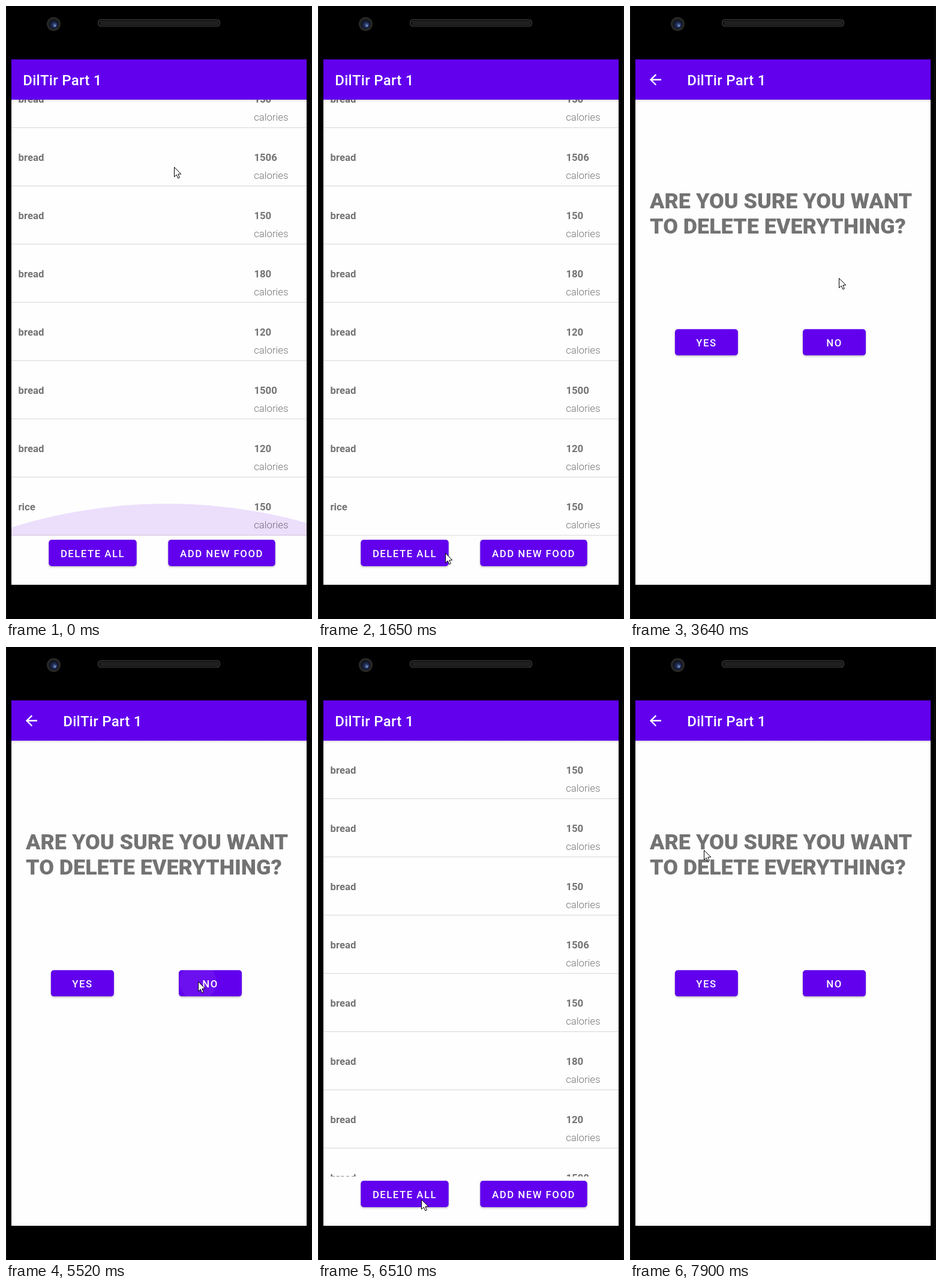
Animation, 510 px wide and 1021 px high, one loop 8 s. Source, as an HTML page with a canvas:

```html
<!DOCTYPE html>
<html lang="en">
<head>
<meta charset="utf-8">
<title>Calorie list</title>
<style>
  html, body { margin: 0; width: 100%; height: 100%; overflow: hidden; background: #000; }
  canvas { display: block; width: 510px; height: 1021px; }
</style>
</head>
<body>
<canvas id="stage" width="510" height="1021"></canvas>
<script>
const ctx = document.getElementById('stage').getContext('2d');
const LOOP = 8000;
const PURPLE = '#6200ee', PAPER = '#fefefe', GREY = '#737373';
const SCREEN = { x: 9, y: 89, w: 492, h: 875 };
const LIST_TOP = 156, LIST_BOTTOM = 882, ROW = 97;
const TITLE = 'DilTir Part 1';

const foods = [150, 150, 150, 1506, 150, 180, 120, 1500, 120, 150]
  .map((calories, i) => ({ name: i === 9 ? 'rice' : 'bread', calories }));

const buttons = {
  deleteAll: { label: 'DELETE ALL', x: 71.3, y: 889, w: 146.4, h: 44 },
  addFood: { label: 'ADD NEW FOOD', x: 270.3, y: 889, w: 178.4, h: 44 },
  yes: { label: 'YES', x: 74.9, y: 538.3, w: 105, h: 43.5 },
  no: { label: 'NO', x: 288, y: 538.3, w: 105, h: 43.5 }
};

const cadence = [
  [0, 1], [120, 7], [1140, 1], [1260, 3], [1650, 4], [2230, 1], [2380, 7], [3370, 1],
  [3520, 1], [3640, 6], [4450, 1], [4740, 6], [5520, 1], [5640, 1], [5790, 5],
  [6510, 1], [6970, 7], [7900, 1], [LOOP, 1]
];

const pointer = [
  [0, 280, 268], [1140, 334, 916], [1650, 212, 911], [2085, 152, 918], [2380, 152, 919],
  [3370, 361, 355], [3640, 348, 453], [4450, 136, 560], [4740, 146, 563], [5100, 240, 567],
  [5520, 320, 557], [5790, 319, 558], [6510, 172, 920], [7230, 172, 920],
  [7900, 123, 338], [LOOP, 123, 338]
];

const presses = [
  { at: 2080, button: buttons.deleteAll, x: 152, y: 918 },
  { at: 5515, button: buttons.no, x: 320, y: 558 },
  { at: 6965, button: buttons.deleteAll, x: 172, y: 920 }
];

const visits = [
  { at: 0, draw: t => drawList(t, 244) },
  { at: 2380, draw: drawConfirm },
  { at: 5790, draw: t => drawList(t, 0) },
  { at: 7230, draw: drawConfirm }
];

const clamp = v => Math.min(1, Math.max(0, v));
const smooth = p => p * p * (3 - 2 * p);

function lastAt(items, t, timeOf) {
  let i = items.length - 1;
  while (i > 0 && timeOf(items[i]) > t) i--;
  return i;
}

function stepTime(t) {
  const i = Math.min(lastAt(cadence, t, c => c[0]), cadence.length - 2);
  const [start, steps] = cadence[i];
  const span = (cadence[i + 1][0] - start) / steps;
  return start + span * Math.floor((t - start) / span + 1e-6);
}

// Cubic bezier (0.4, 0, 0.2, 1)
function fastOutSlowIn(p) {
  let lo = 0, hi = 1;
  for (let i = 0; i < 20; i++) {
    const u = (lo + hi) / 2, v = 1 - u;
    if (1.2 * v * v * u + 0.6 * v * u * u + u * u * u < p) lo = u; else hi = u;
  }
  return lo * lo * (3 - 2 * lo);
}

function rect(x, y, w, h, color) {
  ctx.fillStyle = color;
  ctx.fillRect(x, y, w, h);
}

function roundRect(x, y, w, h, r) {
  ctx.beginPath();
  ctx.roundRect(x, y, w, h, r);
}

function disc(x, y, r, color) {
  ctx.fillStyle = color;
  ctx.beginPath();
  ctx.arc(x, y, r, 0, Math.PI * 2);
  ctx.fill();
}

function text(str, x, y, size, weight, color, spacing = 0, align = 'left') {
  ctx.font = `${weight} ${size}px Roboto, sans-serif`;
  ctx.letterSpacing = spacing + 'px';
  ctx.textAlign = align;
  ctx.fillStyle = color;
  ctx.fillText(str, x, y);
}

function clipped(x, y, w, h, draw) {
  ctx.save();
  ctx.beginPath();
  ctx.rect(x, y, w, h);
  ctx.clip();
  draw();
  ctx.restore();
}

function drawButton(button, t) {
  const { x, y, w, h, label } = button;
  ctx.save();
  ctx.shadowColor = 'rgba(0,0,0,.26)';
  ctx.shadowBlur = 3;
  ctx.shadowOffsetY = 1.6;
  ctx.fillStyle = PURPLE;
  roundRect(x, y, w, h, 4.8);
  ctx.fill();
  ctx.restore();

  const press = presses.find(p => p.button === button && t >= p.at && t < p.at + 400);
  if (press) {
    const age = t - press.at;
    ctx.save();
    roundRect(x, y, w, h, 4.8);
    ctx.clip();
    disc(press.x, press.y, 29 + age * 0.35, `rgba(255,255,255,${0.06 + 0.08 * clamp(age / 150)})`);
    ctx.restore();
  }
  text(label, x + w / 2, y + h / 2 + 6.7, 16.76, 500, '#fff', 1.5, 'center');
}

function drawPage(titleX) {
  rect(SCREEN.x, SCREEN.y, SCREEN.w, SCREEN.h, PAPER);
  const shade = ctx.createLinearGradient(0, LIST_TOP, 0, LIST_TOP + 4);
  shade.addColorStop(0, 'rgba(0,0,0,.13)');
  shade.addColorStop(1, 'rgba(0,0,0,0)');
  return () => {
    rect(SCREEN.x, LIST_TOP, SCREEN.w, 4, shade);
    rect(SCREEN.x, SCREEN.y, SCREEN.w, LIST_TOP - SCREEN.y, PURPLE);
    text(TITLE, titleX, 131.7, 23.94, 500, '#fff', 0.3);
  };
}

function drawGlow(t) {
  const fade = (1 - clamp(t / 600)) ** 2;
  if (!fade) return;
  ctx.fillStyle = `rgba(98,0,238,${0.12 * fade})`;
  ctx.beginPath();
  ctx.ellipse(268, LIST_BOTTOM + 812 * fade, 865, 865 * fade, 0, 0, Math.PI * 2);
  ctx.fill();
}

function drawList(t, scroll) {
  const drawBar = drawPage(28.2);
  clipped(SCREEN.x, LIST_TOP, SCREEN.w, LIST_BOTTOM - LIST_TOP, () => {
    foods.forEach((food, i) => {
      const top = LIST_TOP + i * ROW - scroll;
      text(food.name, 20.5, top + 55, 16.76, 700, GREY);
      text(food.calories, 413.4, top + 55, 16.76, 700, GREY);
      text('calories', 413.2, top + 84.5, 16.76, 300, GREY);
      rect(SCREEN.x, top + 96, SCREEN.w, 1.2, '#dcdcdc');
    });
    if (scroll) drawGlow(t);
  });
  drawBar();
  drawButton(buttons.deleteAll, t);
  drawButton(buttons.addFood, t);
}

const backArrow = new Path2D('M20 11H7.83l5.59-5.59L12 4l-8 8 8 8 1.41-1.41L7.83 13H20z');

function drawConfirm(t) {
  drawPage(95.2)();
  ctx.save();
  ctx.translate(28.1, 108.4);
  ctx.scale(1.197, 1.197);
  ctx.fillStyle = '#fff';
  ctx.fill(backArrow);
  ctx.restore();
  text('ARE YOU SURE YOU WANT', 33, 337, 35.9, 900, GREY);
  text('TO DELETE EVERYTHING?', 33, 379, 35.9, 900, GREY);
  drawButton(buttons.yes, t);
  drawButton(buttons.no, t);
}

function scaled(scale, draw) {
  const cx = SCREEN.x + SCREEN.w / 2, cy = SCREEN.y + SCREEN.h / 2;
  ctx.save();
  ctx.translate(cx, cy);
  ctx.scale(scale, scale);
  ctx.translate(-cx, -cy);
  clipped(SCREEN.x, SCREEN.y, SCREEN.w, SCREEN.h, draw);
  ctx.restore();
}

function drawScreen(t) {
  const i = lastAt(visits, t, v => v.at);
  const progress = i ? fastOutSlowIn(clamp((t - visits[i].at + 251) / 400)) : 1;
  clipped(SCREEN.x, SCREEN.y, SCREEN.w, SCREEN.h, () => {
    if (progress < 0.999) {
      scaled(1 + 0.05 * progress, () => visits[i - 1].draw(t));
      rect(SCREEN.x, SCREEN.y, SCREEN.w, SCREEN.h, 'rgba(0,0,0,.25)');
      scaled(0.85 + 0.15 * progress, () => visits[i].draw(t));
    } else {
      visits[i].draw(t);
    }
  });
}

function drawPhone() {
  rect(0, 0, 510, 1021, '#000');
  rect(0, 0, 1.5, 1021, '#101010');
  rect(507.5, 0, 1.5, 1021, '#101010');

  disc(79.5, 30, 11.5, '#292929');
  disc(79.5, 30, 8.5, '#15171f');
  const lens = ctx.createRadialGradient(82, 33, 0, 80, 31, 7);
  lens.addColorStop(0, '#c3d0f0');
  lens.addColorStop(0.25, '#43598f');
  lens.addColorStop(0.6, '#1d2a52');
  lens.addColorStop(1, '#12172c');
  disc(80, 31, 6.5, lens);

  roundRect(153.5, 22.5, 203, 11.5, 5);
  ctx.fillStyle = '#141414';
  ctx.fill();
  ctx.strokeStyle = '#3b3b3b';
  ctx.lineWidth = 1.2;
  ctx.stroke();
  for (let x = 158; x < 353; x += 2) rect(x, 25, 1, 7, '#2c2c2c');
}

function drawPointer(t) {
  const i = Math.min(lastAt(pointer, t, k => k[0]), pointer.length - 2);
  const [t0, x0, y0] = pointer[i], [t1, x1, y1] = pointer[i + 1];
  const p = smooth(clamp((t - t0) / (t1 - t0)));
  ctx.save();
  ctx.translate(Math.round(x0 + (x1 - x0) * p) + 0.5, Math.round(y0 + (y1 - y0) * p) + 0.5);
  ctx.beginPath();
  for (const [x, y] of [[0, 0], [0, 16], [3.7, 12.6], [6.3, 18.4], [8.8, 17.3], [6.3, 11.6], [11.3, 11.4]])
    ctx.lineTo(x, y);
  ctx.closePath();
  ctx.fillStyle = '#fff';
  ctx.fill();
  ctx.strokeStyle = '#000';
  ctx.lineWidth = 1;
  ctx.stroke();
  ctx.restore();
}

function render(now) {
  const t = stepTime(now % LOOP);
  drawPhone();
  drawScreen(t);
  drawPointer(t);
}

let origin;
function tick(now) {
  origin ??= now;
  render(now - origin);
  requestAnimationFrame(tick);
}
render(0);
requestAnimationFrame(tick);
</script>
</body>
</html>
```
